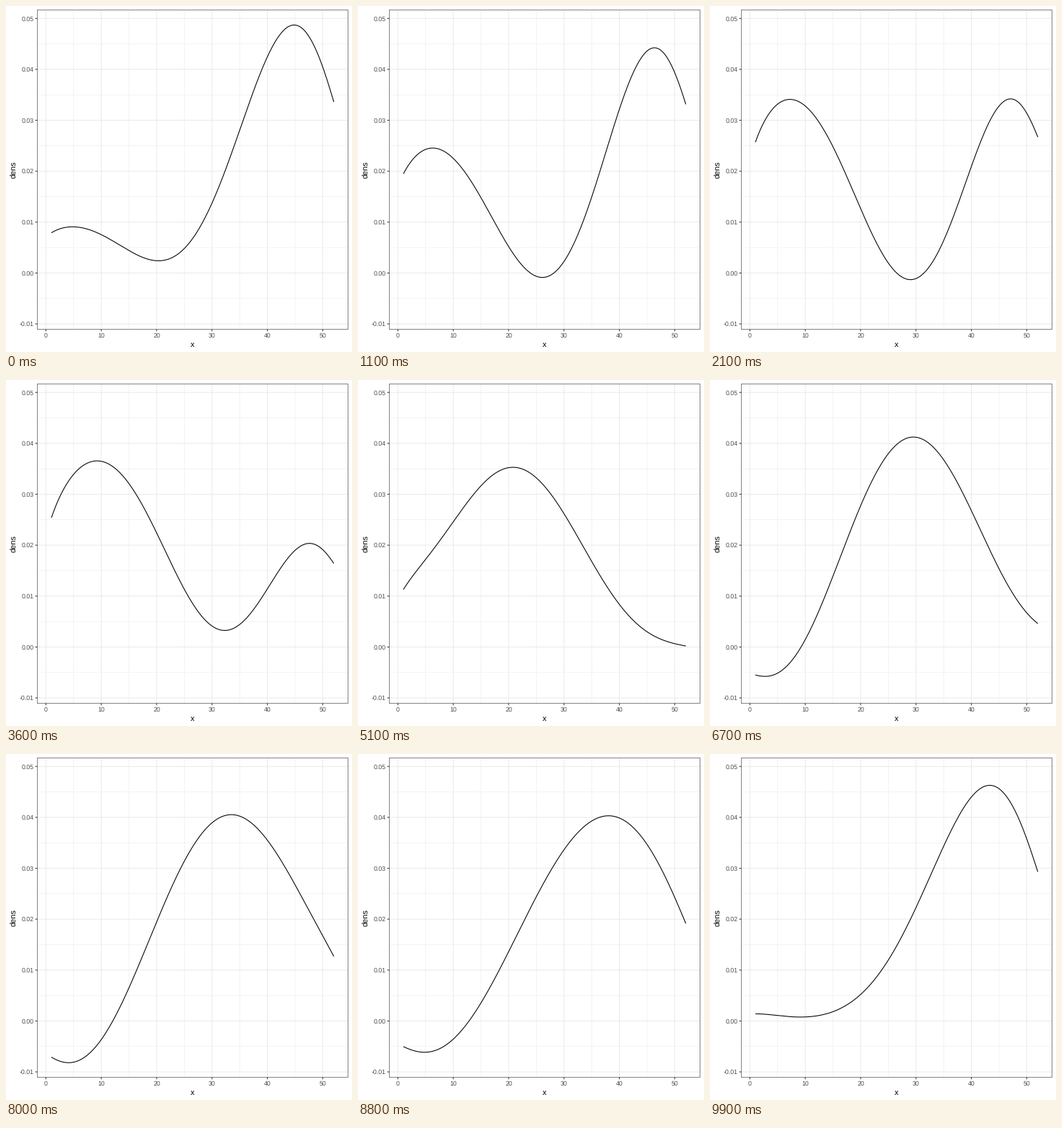
Animation of 480 by 480 pixels, one loop 10000 ms. Source, as a matplotlib script:

```python
import numpy as np
import matplotlib.pyplot as plt
from matplotlib.animation import FuncAnimation
from numpy.polynomial.chebyshev import chebvander

SIZE, DPI = 480, 80
PT = 72 / DPI                                   # points per pixel
LEFT, RIGHT, TOP, BOTTOM = 43.4, 474.5, 5.5, 448.5
X0, XS = 55.3, 7.682                            # pixel of x = 0, pixels per unit
Y0, YS = 370.4, 7063                            # pixel of y = 0, pixels per unit
FRAMES, STEPS, PERIOD = 100, 48, 52
DEGREE, HARMONICS = 7, 3

plt.rcParams["font.family"] = "Liberation Sans"
plt.rcParams["path.snap"] = False
plt.rcParams["text.hinting"] = "no_hinting"

# Key poses, step: heights at the Chebyshev points of the week axis, times 10000
POSES = {
    0: [79, 89.5, 72, 24.2, 195, 470, 420, 336],
    10: [257, 314, 322, 106, 9, 277, 323, 267],
    17: [254, 316, 363, 205.5, 32.5, 155, 196, 164],
    24: [113, 151.5, 255, 353, 222, 53.5, 8, 2],
    32: [-55, -57, 27, 298, 401.5, 212, 74, 46],
    38: [-71, -81.5, -27, 216, 403, 316.5, 177.5, 127],
    47: [14, 12.5, 8.3, 60.7, 275, 461, 373, 293],
}


def season(step):
    """Two runs of 24 steps on a yearly cycle, with a short gap after each."""
    step = np.asarray(step, float)
    return step + 2 * (step >= STEPS / 2)


def waves(t):
    """Yearly harmonics, one row per time."""
    angle = 2 * np.pi * np.outer(t, np.arange(1, HARMONICS + 1)) / PERIOD
    return np.hstack([np.ones((len(t), 1)), np.cos(angle), np.sin(angle)])


# Each curve is a polynomial in x whose shape swings with the harmonics.
u = np.linspace(-1, 1, 256)
nodes = -np.cos(np.pi * np.arange(DEGREE + 1) / DEGREE)
poses = np.array(list(POSES.values())) / 1e4
swing = np.linalg.solve(waves(season(list(POSES))), poses)
heights = waves(season(np.arange(STEPS))) @ swing
shapes = np.linalg.solve(chebvander(nodes, DEGREE), heights.T)
curves = (chebvander(u, DEGREE) @ shapes).T
weeks = 26.5 + 25.5 * u
starts = np.round(np.arange(STEPS) * (FRAMES - 1) / (STEPS - 1))

fig = plt.figure(figsize=(SIZE / DPI, SIZE / DPI), dpi=DPI, facecolor="white")
page = fig.add_axes([0, 0, 1, 1])
page.set(xlim=(0, SIZE), ylim=(SIZE, 0))
page.axis("off")


def rule(xx, yy, color, width):
    page.plot(xx, yy, color=color, lw=width * PT, solid_capstyle="butt")


def label(x, y, text, size, color, ha="center", turn=0):
    page.text(x, y, text, fontsize=size * PT, color=color, ha=ha,
              va="baseline", rotation=turn, rotation_mode="anchor")


def px(x):
    return X0 + XS * x


def py(y):
    return Y0 - YS * y


def grid(x_marks, y_marks, width):
    for x in x_marks:
        rule([px(x)] * 2, [TOP, BOTTOM], "#ebebeb", width)
    for y in y_marks:
        rule([LEFT, RIGHT], [py(y)] * 2, "#ebebeb", width)


x_major = np.arange(0, 51, 10)
y_major = np.arange(-1, 6) / 100
grid(x_major[:-1] + 5, y_major[:-1] + 0.005, 0.55)
grid(x_major, y_major, 1.07)

line, = page.plot([], [], color="black", lw=1.07 * PT, solid_capstyle="butt",
                  solid_joinstyle="round")

rule([LEFT, RIGHT, RIGHT, LEFT, LEFT], [TOP, TOP, BOTTOM, BOTTOM, TOP],
     "#333333", 0.6)
for x in x_major:
    rule([px(x)] * 2, [BOTTOM, BOTTOM + 2.75], "#333333", 1.07)
    label(px(x), 460, f"{x}", 8.8, "#4d4d4d")
for y in y_major:
    rule([LEFT - 2.75, LEFT], [py(y)] * 2, "#333333", 1.07)
    label(38.4, py(y) + 3.2, f"{y:.2f}", 8.8, "#4d4d4d", ha="right")
label((LEFT + RIGHT) / 2, 473, "x", 11, "black")
label(14, (TOP + BOTTOM) / 2, "dens", 11, "black", turn=90)


def draw(i):
    step = np.searchsorted(starts, i, "right") - 1
    line.set_data(px(weeks), py(curves[step]))
    return line,


anim = FuncAnimation(fig, draw, frames=FRAMES, interval=100, repeat=True,
                     repeat_delay=0)
plt.show()
```
